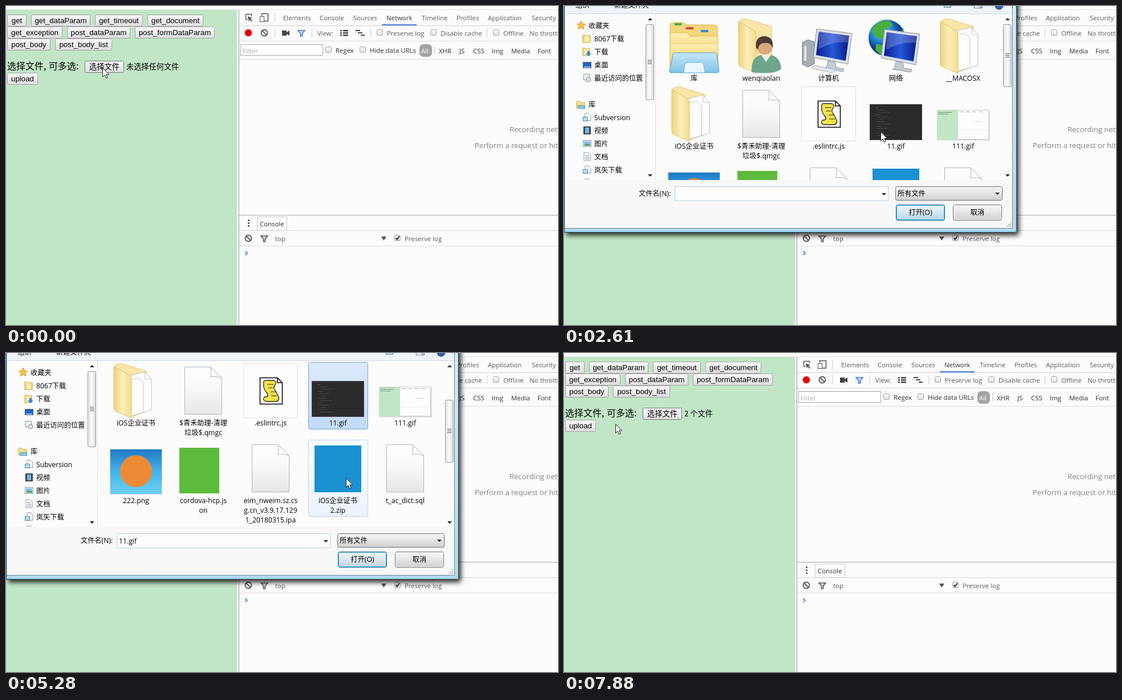
An HTML page that plays this animation: 968x559 px, repeating every 8 s.

```html
<!DOCTYPE html>
<html lang="zh">
<head>
<meta charset="utf-8">
<title>File upload</title>
<style>
html, body { margin: 0; width: 100%; height: 100%; overflow: hidden; background: #fcfcfc; }
svg { display: block; width: 968px; height: 559px; }
text { font: 11.4px "Open Sans", "Noto Sans CJK SC", sans-serif; fill: #5a5a5a; white-space: pre; }
.dark text, text.dark { fill: #303030; }
.btn text { font: 13.33px "Liberation Sans", "Noto Sans CJK SC", sans-serif; fill: #000; }
.page { font: 16px "Noto Sans CJK SC", sans-serif; fill: #000; }
.small { font-size: 13.2px; }
.hint { font-size: 13px; fill: #808080; }
#dialog text { font-size: 12.2px; fill: #000; }
.mid { text-anchor: middle; }
#frame { filter: drop-shadow(4px 5px 4px rgba(0,0,0,.8)); }
.step { animation: 8s step-end infinite; }
#dialog { animation-name: dialog; }
#list { animation-name: scroll; }
#thumb { animation-name: thumb; }
#ring { animation-name: ring; }
#cursor { animation-name: cursor; }
#hover { animation-name: hover; }
#hover rect { width: 104px; height: inherit; }
#glow { animation: pulse 1s -.21s ease-in-out infinite alternate; }
.first { animation-name: first; }
.one { animation-name: one; }
.both { animation-name: both; }
.none { animation-name: none-yet; }
.done { animation-name: done; }
.hoverNo { animation-name: hoverNo; }
@keyframes pulse { from {opacity:.1} to {opacity:.7} }
@keyframes dialog { 0% {opacity:0} 22.375% {opacity:.6} 23.875% {opacity:1} 86.3% {opacity:.4} 88.09%, to {opacity:0} }
@keyframes scroll { 0% {transform:none} 41%, to {transform:translateY(-123px)} }
@keyframes thumb { 0% {transform:none} 41%, to {transform:translateY(50px)} }
@keyframes ring { 0% {opacity:0} 12.5% {opacity:1} 15.5% {opacity:0} 20.875% {opacity:1} 22.375%, to {opacity:0} }
@keyframes first { 0% {opacity:0} 36%, to {opacity:1} }
@keyframes one { 0% {opacity:0} 36% {opacity:1} 68.4%, to {opacity:0} }
@keyframes both { 0% {opacity:0} 68.4%, to {opacity:1} }
@keyframes none-yet { 0% {opacity:1} 86.3%, to {opacity:0} }
@keyframes done { 0% {opacity:0} 86.3%, to {opacity:1} }
@keyframes hoverNo { 0% {opacity:0} 75.5% {opacity:1} 80.875%, to {opacity:0} }
@keyframes hover {
  0% {opacity:0}
  23.875% {opacity:1; height:117px; transform:translate(176px,20px)}
  27.375% {opacity:1; height:117px; transform:translate(294px,20px)}
  29.125% {opacity:1; height:117px; transform:translate(412px,139px)}
  30.875% {opacity:0}
  34.25% {opacity:1; height:117px; transform:translate(530px,139px)}
  36% {opacity:0}
  41% {opacity:1; height:134px; transform:translate(530px,275px)}
  49.5% {opacity:1; height:151px; transform:translate(412px,275px)}
  52.875% {opacity:1; height:134px; transform:translate(294px,275px)}
  56.375% {opacity:1; height:151px; transform:translate(412px,275px)}
  58% {opacity:1; height:134px; transform:translate(530px,275px)}
  68.4% {opacity:0}
  71.75% {opacity:1; height:117px; transform:translate(648px,275px)}
  73.5%, to {opacity:0}
}
@keyframes cursor {
  0% {transform:translate(169px,108px)}
  1.875% {transform:translate(170px,103px)}
  5.375% {transform:translate(168px,103px)}
  7% {transform:translate(167px,103px)}
  8.75% {transform:translate(170px,103px)}
  23.875% {transform:translate(186px,106px)}
  27.375% {transform:translate(310px,122px)}
  29.125% {transform:translate(445px,170px)}
  30.875% {transform:translate(535px,212px)}
  32.625% {transform:translate(555px,220px)}
  34.25% {transform:translate(575px,216px)}
  36% {transform:translate(590px,212px)}
  37.625% {transform:translate(600px,210px)}
  47.75% {transform:translate(572px,214px)}
  49.5% {transform:translate(500px,220px)}
  51.25% {transform:translate(420px,222px)}
  52.875% {transform:translate(365px,222px)}
  54.75% {transform:translate(370px,222px)}
  56.375% {transform:translate(470px,222px)}
  58% {transform:translate(574px,221px)}
  59.625% {transform:translate(596px,219px)}
  70% {transform:translate(614px,240px)}
  71.75% {transform:translate(663px,286px)}
  73.5% {transform:translate(706px,332px)}
  75.5% {transform:translate(732px,356px)}
  77.375% {transform:translate(735px,364px)}
  79.125% {transform:translate(722px,365px)}
  80.875% {transform:translate(675px,366px)}
  82.7% {transform:translate(645px,366px)}
  84.5% {transform:translate(640px,366px)}
  89.875% {transform:translate(599px,366px)}
  91.75% {transform:translate(400px,310px)}
  93.375% {transform:translate(225px,225px)}
  95.125% {transform:translate(110px,155px)}
  96.875% {transform:translate(72px,130px)}
  98.5%, to {transform:translate(90px,124px)}
}
</style>
</head>
<body>
<svg id="stage" viewBox="0 0 968 559"></svg>
<script>
const rect = (x, y, w, h, fill, stroke, r = 0) => stroke
  ? `<rect x="${x + .5}" y="${y + .5}" width="${w - 1}" height="${h - 1}" rx="${r}" fill="${fill}" stroke="${stroke}"/>`
  : `<rect x="${x}" y="${y}" width="${w}" height="${h}" rx="${r}" fill="${fill}"/>`;
const path = (d, fill, stroke = 'none', w = 1) =>
  `<path d="${d}" fill="${fill}" stroke="${stroke}" stroke-width="${w}"/>`;
const circle = (x, y, r, fill, stroke = 'none', w = 1) =>
  `<circle cx="${x}" cy="${y}" r="${r}" fill="${fill}" stroke="${stroke}" stroke-width="${w}"/>`;
const text = (x, y, s, cls = '') => `<text x="${x}" y="${y}" class="${cls}">${s}</text>`;
const at = (x, y, body) => `<g transform="translate(${x} ${y})">${body}</g>`;
const step = (cls, body) => `<g class="step ${cls}">${body}</g>`;
const each = (rows, fn) => rows.map(r => fn(...r)).join('');
const grad = (id, stops, across) => `<linearGradient id="${id}" ${across ? '' : 'x2="0" y2="1"'}>` +
  stops.map((c, i) => `<stop offset="${i / (stops.length - 1)}" stop-color="${c}"/>`).join('') + '</linearGradient>';

const defs = `<defs>
${grad('face', ['#f8f8f8', '#ededed', '#dcdcdc'])}
${grad('win', ['#f4f4f4', '#ececec', '#dddddd', '#d0d0d0'])}
${grad('cool', ['#eef5fa', '#e0edf6', '#c8dbe9'])}
${grad('blue', ['#e6f6fd', '#cdebf9', '#a4d9f3'])}
${grad('sel', ['#dceafc', '#c1dbfc'])}
${grad('hov', ['#fbfdff', '#ebf3fd'])}
${grad('fold', ['#fff0b4', '#f5d982', '#e6c25c'])}
${grad('flap', ['#efd37c', '#fcefbb', '#f4dc8c'], true)}
${grad('paper', ['#ffffff', '#f7f7f7', '#e6e6e6'])}
${grad('tray', ['#c5e8f8', '#7fc2e6'])}
${grad('screen', ['#0a1c92', '#2458d8', '#0a1a86'], true)}
${grad('sky', ['#1e78c8', '#43b5ea', '#6fd0f0'])}
${grad('bar', ['#e4e4e4', '#fbfbfb', '#d5d5d5'], true)}
${grad('glass', ['#d9ecf8', '#b4d7ec'])}
<radialGradient id="globe" cx=".35" cy=".3"><stop offset="0" stop-color="#8ce0ff"/><stop offset=".6" stop-color="#1f82d6"/><stop offset="1" stop-color="#0a3f8e"/></radialGradient>
<clipPath id="files"><rect x="161" y="14" width="608" height="291"/></clipPath>
<clipPath id="side"><rect x="2" y="14" width="158" height="291"/></clipPath>
<clipPath id="win-clip"><path d="M0 0H794V392Q794 397 789 397H0Z"/></clipPath>
</defs>`;

// Web page
const button = (s, x, y, w, edge = '#a3a3a3') =>
  `<g class="btn">${rect(x, y, w, 21, 'url(#face)', edge, 2)}${text(x + w / 2, y + 15, s, 'mid')}</g>`;
const page = rect(0, 0, 968, 7, '#fcfcfc') + rect(0, 6, 968, 1, '#e2e2e2') +
  rect(0, 7, 405, 552, '#c1e6c6') + rect(405, 7, 3, 552, '#f5f5f5') + rect(408, 7, 1, 552, '#a3a3a3') +
  each([['get', 2, 15, 34], ['get_dataParam', 44, 15, 104], ['get_timeout', 156, 15, 84],
    ['get_document', 248, 15, 98], ['get_exception', 2, 36, 97], ['post_dataParam', 107, 36, 111],
    ['post_formDataParam', 226, 36, 140], ['post_body', 2, 57, 76], ['post_body_list', 86, 57, 100],
    ['选择文件', 138, 96, 69, '#777'], ['upload', 2, 117, 54]], button) +
  text(2, 111, '选择文件,', 'page') + text(75, 111, '可多选:', 'page') +
  step('none', text(211, 111, '未选择任何文件', 'page small')) +
  step('done', text(211, 111, '2 个文件', 'page small'));

// Developer tools
const check = (x, y, on) => rect(x, y, 11, 11, 'url(#face)', '#a5a5a5', 2) +
  (on ? path(`M${x + 2.5} ${y + 5.5}l2.3 2.7 4-6`, 'none', '#333', 2) : '');
const sep = (x, y) => rect(x, y, 1, 16, '#cfcfcf');
const block = (x, y) => circle(x, y, 5.5, 'none', '#555', 1.8) + path(`M${x - 4} ${y - 4}l8 8`, 'none', '#555', 1.8);
const funnel = (x, y, fill, edge) => path(`M${x + 1} ${y + 1}h12l-4.5 5v5h-3v-5z`, fill, edge, 1.6);
const line = (y, c = '#dcdcdc') => rect(409, y, 559, 1, c);
const tools = line(34, '#cfcfcf') + line(61) + line(93) + line(366, '#a9a9a9') + line(393, '#d4d4d4') + line(420) +
  path('M424 23.500H420.500V14.500H430.500V18', 'none', '#555', 1.4) +
  path('M424 18l8 3-3.200 1.500 3.200 3.500-1.500 1.400-3.200-3.500-1.500 3z', '#555') +
  path('M448.500 17V13.500H459.500V26.500H453', 'none', '#555', 1.5) + rect(445, 18, 8, 10, '#fcfcfc', '#555') +
  sep(471, 12) + rect(659, 32, 61, 2, '#4a80e0') +
  each([[486, 'Elements'], [550, 'Console'], [609, 'Sources'], [667, 'Network', 'dark'], [729, 'Timeline'],
    [790, 'Profiles'], [845, 'Application'], [922, 'Security']], (x, s, c) => text(x, 25, s, c)) +
  circle(425, 47, 7.5, '#f9c8c8') + circle(425, 47, 6, '#e00000') + block(453, 47) + sep(471, 39) +
  path('M484 43h8v3l5-3v9l-5-3v3h-8z', '#444') + funnel(511, 42, '#d5e5ff', '#3478e6') + sep(536, 39) +
  [42, 46, 50].map(y => rect(586, y, 3, 2.500, '#444') + rect(591, y, 9, 2.500, '#444')).join('') +
  rect(613, 42, 8, 2, '#444') + rect(617, 46, 8, 2, '#444') + rect(622, 50, 7, 2, '#444') + rect(613, 46, 2, 1, '#999') +
  sep(639, 39) + sep(843, 39) + check(650, 41) + check(744, 41) + check(854, 41) +
  each([[546, 'View:'], [668, 'Preserve log'], [762, 'Disable cache'], [872, 'Offline'], [918, 'No throttling']],
    (x, s) => text(x, 52, s)) +
  rect(411, 67, 145, 20, '#fff', '#a9a9a9') + `<g opacity=".5">${text(415, 83, 'Filter')}</g>` +
  check(560, 71) + check(620, 71) + rect(725, 67, 22, 22, '#a3a3a3', null, 7) +
  `<text x="728" y="83" style="fill:#fff">All</text>` + sep(751, 69) +
  `<g class="dark">${each([[578, 'Regex'], [638, 'Hide data URLs']], (x, s) => text(x, 82, s))}
  ${each([[759, 'XHR'], [795, 'JS'], [819, 'CSS'], [852, 'Img'], [886, 'Media'], [932, 'Font']], (x, s) => text(x, 83, s))}
  ${rect(440, 369, 53, 25, '#fcfcfc', '#c8c8c8')}${text(445, 386, 'Console')}</g>` +
  text(883, 221, 'Recording network activity…', 'hint') +
  text(822, 249, 'Perform a request or hit F5 to record the reload.', 'hint') +
  [376, 381, 386].map(y => circle(425.5, y - .5, 1.5, '#444')).join('') +
  block(425, 407) + funnel(446, 402, '#ddd', '#555') + text(472, 412, 'top') +
  path('M658 404h9l-4.500 7z', '#555') + check(681, 401, true) + text(699, 412, 'Preserve log') +
  path('M419.500 430l3.500 3.200-3.500 3.200', 'none', '#3f7fe8', 1.7);

// File icons
const sheet = (x, y, w = 66, h = 84) => at(x, y,
  path(`M.5 .5H${w - 20}L${w - .5} 20V${h - .5}H.5Z`, 'url(#paper)', '#b5b5b5') +
  path(`M${w - 20} .5Q${w - 18} 14 ${w - 21} 18Q${w - 8} 16 ${w - .5} 20Z`, '#fff', '#b5b5b5'));
const folder = (x, y, papers) => at(x, y,
  path('M2 3L12 0 58 14V84L28 95Z', '#f9e6a8', '#e3c671') +
  (papers ? path('M27 22L54 15 66 28V82L28 93Z', '#fdfdfd', '#bdbdbd') +
    path('M54 15l1 13 11 0M32 28l12-2 8 8V86', 'none', '#c4c4c4') : '') +
  path('M0 5L27 21Q31 23 31 28V96L3 84Q0 82 0 78Z', 'url(#flap)', '#dfc06a'));
const monitor = (x, y) => at(x, y,
  path('M26 56l12 2 2 10 14 2-2 5-32-5 4-4z', '#c3ccd4', '#8d98a2') +
  path('M6 0L68 8 61 62 0 50Z', '#d8dfe5', '#8a959f') + path('M10 5l53 7-6 44-52-10z', 'url(#screen)') +
  `<g opacity=".2">${path('M10 5l53 7-2 12Q36 20 9 36z', '#fff')}</g>`);
const library = path('M186 34Q186 29 191 29H210L214 33H264Q269 33 269 38V110H186Z', '#f3d67b', '#dcb850') +
  rect(194, 30, 12, 4, '#3fae49') + rect(214, 37, 13, 4, '#d0493a') + rect(240, 42, 13, 4, '#3b87c9') +
  path('M186 47H216L221 53H270V110H186Z', 'url(#fold)', '#dfbd58') + path('M186 66H270V112H186Z', 'url(#fold)', '#e3c56c') +
  path('M192 82H264Q268 82 268 86L272 114Q272 117 268 117H188Q184 117 185 113Z', 'url(#tray)', '#58a3cd') +
  path('M210 117L212 103Q213 99 217 99H240Q244 99 245 103L247 117Z', '#eaf6fc', '#79b8da');
const user = folder(306, 22) +
  path('M329 116Q328 88 346 86H362Q379 88 381 110Q370 121 329 116Z', '#6ea68c') +
  path('M346 86l8 12 9-12z', '#e8efe9') + circle(352, 71, 14, '#d9a878') + path('M337 74Q334 53 352 53 368 54 366 73 362 63 352 65 342 64 340 76Z', '#4a3c32');
const computer = path('M418 64l10-5 11 4v38l-11 6-10-5z', '#a6adb3', '#6f777d') + rect(421, 70, 4, 26, '#dfe5e9') +
  monitor(437, 40) + path('M438 104l40 8-8 5-36-8z', '#e3e8ec', '#a5aeb5');
const network = circle(566, 56, 32, 'url(#globe)') +
  path('M540 40Q552 24 570 25L577 34 566 40 571 50 556 58 544 53Z M575 62l14-10 6-14 3 18-13 22-9-4z M548 66l14 4 1 10-7 6-10-9z', '#4cae3d') + monitor(556, 41);
const script = rect(416, 141, 96, 96, '#fdfdfd', '#dedede') +
  path('M445.500 166.500H476L484.500 175V212.500H445.500Z', '#fff', '#000', 1.5) + path('M476 166v9h9', 'none', '#000', 1.5) +
  path('M452 177Q450 171 456 171H470Q476 174 471 180 468 184 473 190L478 200Q480 208 472 208H456Q449 206 453 200 462 200 458 194 450 184 452 177Z', '#f2e24a', '#222', 1.3) +
  path('M458 178h11m-9 6h8m-4 7h9m-8 7h10', 'none', '#222', 1.2);
const darkShot = rect(536, 172, 92, 63, '#2b2b2b', '#444') +
  Array.from({ length: 13 }, (_, i) => rect(546 + i * 3 % 8, 178 + i * 4, 6 + i * 7 % 17, 1, i % 3 ? '#454545' : '#574f3c')).join('');
const pageShot = rect(655, 183, 92, 53, '#ddd') + rect(654, 182, 91, 52, '#fdfdfd', '#ccc') + rect(654, 183, 37, 51, '#c1e6c6') +
  rect(656, 186, 24, 1, '#79907c') + rect(656, 189, 18, 1, '#79907c') +
  [694, 705, 716, 728].map(x => rect(x, 185, 7, 1, '#aaa')).join('') + rect(692, 217, 52, 1, '#eee') + rect(720, 202, 12, 1, '#ccc');
const photo = rect(182, 291, 92, 80, 'url(#sky)', '#d8d8d8') + circle(228, 330, 28, '#ed8a35');
const tile = (y, h) => rect(530, y, 105, h, 'url(#sel)', '#7da2ce', 3);
const label = (x, y, ...lines) => lines.map((s, i) => text(x, y + 17 * i, s, 'mid')).join('');

const files = `<g id="hover" class="step">${rect(0, 0, 105, 118, 'url(#hov)', '#b8d6fb', 3)}</g>` +
  step('first', tile(139, 118)) + step('both', tile(275, 135)) +
  library + user + computer + network + folder(660, 22, true) +
  folder(189, 141, true) + sheet(313, 147) + script + darkShot + pageShot +
  photo + rect(304, 289, 70, 80, '#5dbb3c') + sheet(431, 283) + rect(541, 285, 82, 82, '#1a91d0') + sheet(667, 283) +
  each([[228, 131, '库'], [346, 131, 'wenqiaolan'], [464, 131, '计算机'], [582, 131, '网络'], [700, 131, '__MACOSX'],
    [228, 250, 'iOS企业证书'], [346, 250, '$青禾助理-清理', '垃圾$.qmgc'], [464, 250, '.eslintrc.js'],
    [582, 250, '11.gif'], [700, 250, '111.gif'], [228, 386, '222.png'], [346, 386, 'cordova-hcp.js', 'on'],
    [464, 386, 'eim_nweim.sz.cs', 'g.cn_v3.9.17.129', '1_20180315.ipa'], [582, 386, 'iOS企业证书', '2.zip'],
    [700, 386, 't_ac_dict.sql']], label);

// Dialog side pane and controls
const mini = {
  folder: path('M0 1h5l1 1h7v12H0z', 'url(#flap)', '#cfa53d'),
  down: path('M0 1h5l1 1h6v12H0z', 'url(#flap)', '#cfa53d') + path('M8 6h4v4h3l-5 5-5-5h3z', '#2b8bd8'),
  desk: rect(0, 2, 15, 11, '#1f62c4', '#567') + rect(2, 10, 11, 2, '#8cc0ee'),
  recent: rect(1, 0, 11, 11, '#eef3f6', '#8b98a2') + circle(10, 10, 4, '#d5e6ef', '#7c8b96'),
  lib: path('M0 1h6l1 2h7v10H0z', 'url(#fold)', '#cfa53d') + rect(3, 8, 12, 6, '#8bc9ea', '#4b9bc9'),
  svn: path('M4 0h6l4 4v9H4z', '#fff', '#89a') + rect(0, 6, 9, 8, '#b5daf0', '#4f8fb8'),
  film: rect(1, 0, 13, 14, '#3f4a52') + rect(4, 2, 7, 10, '#75b5dd'),
  image: rect(0, 1, 15, 12, '#fff', '#8497a5') + rect(2, 3, 11, 8, '#7fc1ea') + path('M2 11l4-4 3 2 4-2v4z', '#4e9a4d'),
  doc: path('M2 0h7l4 4v10H2z', '#fff', '#89a') + path('M4 5h6M4 8h7M4 11h7', 'none', '#5b8db5')
};
const arrow = (x, y, d = 1) => path(`M${x - 4} ${y - 2 * d}h8l-4 ${4 * d}z`, '#222');
const bar = (y, h) => rect(0, y, 15, h, 'url(#bar)', '#9a9a9a', 2) +
  [-3, 0, 3].map(d => rect(4, y + h / 2 + d - 1, 7, 1, '#555')).join('');
const side = `<g clip-path="url(#side)">` +
  path('M30 26l2.200 5 5.300.5-4 3.600 1.200 5.400-4.700-2.800-4.700 2.800 1.200-5.400-4-3.600 5.300-.5z', '#fbc33c', '#d4902a') +
  text(43, 39, '收藏夹') + at(22, 166, mini.lib) + text(43, 177, '库') +
  each([[62, 'folder', '8067下载'], [85, 'down', '下载'], [108, 'desk', '桌面'], [131, 'recent', '最近访问的位置'],
    [200, 'svn', 'Subversion'], [223, 'film', '视频'], [246, 'image', '图片'], [269, 'doc', '文档'],
    [292, 'svn', '岚矢下载'], [315, 'svn', '']], (y, icon, s) => at(33, y - 12, mini[icon]) + text(53, y, s)) +
  '</g>' + arrow(151, 23, -1) + arrow(151, 297) + at(143, 0, bar(32, 133));
const winButton = (x, s, edge, glow, fill = 'url(#win)') => rect(x, 348, 86, 28, fill, edge, 3) +
  rect(x + 1, 349, 84, 26, 'none', glow, 2) + text(x + 43, 366, s, 'mid');

const dialog = `<g id="dialog" class="step"><g id="frame">${path('M0 -20H794V392Q794 397 789 397H0Z', 'url(#glass)')}</g>` +
  `<g clip-path="url(#win-clip)">` +
  path('M.500 0V396.500H789Q793.500 396.500 793.500 392V0', 'none', '#33424c') +
  path('M1.500 0V395.500H789Q792.500 395.500 792.500 391V0', 'none', '#7fe0f6') +
  rect(2, 0, 784, 389, '#fcfcfc') + rect(786, 0, 1, 390, '#6f8797') + rect(1, 389, 786, 1, '#6f8797') +
  rect(2, 0, 784, 13, '#eef3fa') + rect(2, 13, 784, 1, '#cdd8e6') +
  text(20, 3, '组织') + text(88, 3, '新建文件夹') +
  rect(666, -8, 13, 11, '#b9d8ef', '#5d88a8') + rect(719, -8, 15, 12, '#fff', '#6b8299') + rect(728, -7, 5, 10, '#9cc4e4') +
  circle(763, -1, 7, '#2b5fb8', '#18376f') + rect(2, 305, 784, 84, '#f8f8f8') + rect(160, 14, 1, 291, '#d6e5f5') + side +
  `<g clip-path="url(#files)"><g id="list" class="step">${files}</g></g>` +
  arrow(778, 23, -1) + arrow(778, 297) + at(770, 0, `<g id="thumb" class="step">${bar(32, 110)}</g>`) +
  text(131, 333, '文件名(N):') + rect(194, 316, 375, 26, '#fdfdfd', '#b5cfe7') + arrow(561, 330) +
  step('one', text(198, 334, '11.gif')) + step('both', text(198, 334, '"iOS企业证书 2.zip" "11.gif"')) +
  rect(581, 316, 188, 25, 'url(#win)', '#707070', 3) + text(585, 333, '所有文件') + arrow(760, 329) +
  winButton(582, '打开(O)', '#2c628b', '#45c4ee') +
  `<g id="glow">${winButton(582, '打开(O)', '#2c628b', '#2fb8ec', 'url(#blue)')}</g>` +
  winButton(682, '取消', '#707070', '#f6f6f6') +
  step('hoverNo', winButton(682, '取消', '#5b7186', '#f4fafd', 'url(#cool)')) +
  [[782, 379], [779, 382], [782, 382], [776, 385], [779, 385], [782, 385]].map(([x, y]) => rect(x, y, 2, 2, '#b5b5b5')).join('') +
  '</g></g>';

const cursor = `<g id="cursor" class="step"><g id="ring" class="step">` +
  circle(13, 0, 6, 'none', '#a6dbe6', 3) + path('M7 0A6 6 0 0 0 17 4.500', 'none', '#22aebd', 3) + '</g>' +
  path('M.500 .500V16.300L4.200 12.900 6.700 18.700 9.200 17.600 6.700 12H11.700Z', '#fff', '#222') + '</g>';

document.getElementById('stage').innerHTML = defs + page + tools + dialog + cursor;
</script>
</body>
</html>
```
